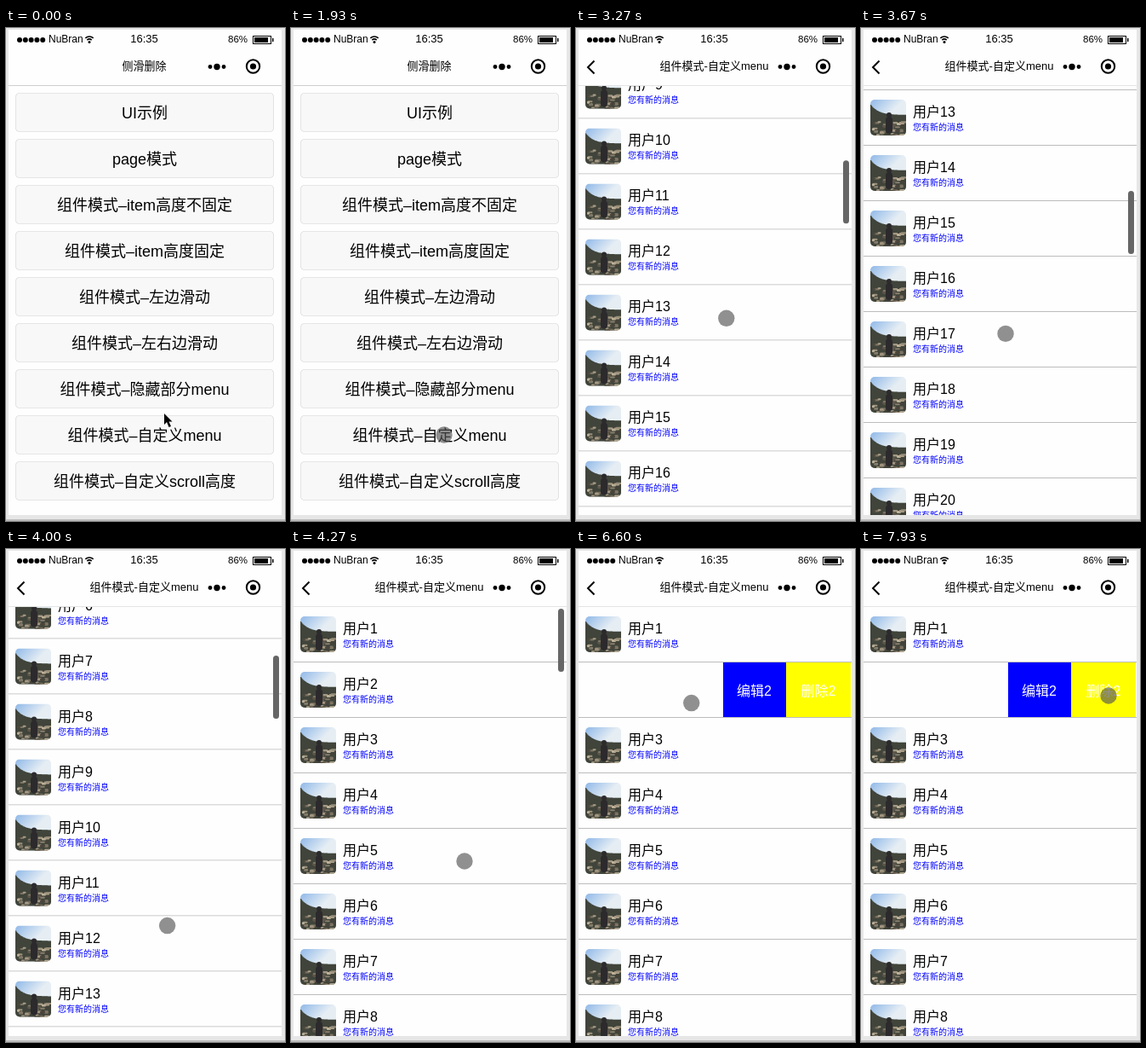
These frames come from a looping animation (328 px wide and 578 px high, 8000 ms). An HTML page with a canvas:

```html
<!DOCTYPE html>
<html lang="zh-CN">
<head>
<meta charset="utf-8">
<style>
html, body { margin: 0; overflow: hidden; }
canvas { display: block; width: 328px; height: 578px; }
</style>
</head>
<body>
<canvas></canvas>
<script>
const W = 328, H = 578, LOOP = 8000;
const TOP = 68, BOTTOM = 571, LEFT = 3, WIDTH = 321, ROW = 65, ROWS = 50, MENU = 151;
const FONT = '"Liberation Sans", "Noto Sans CJK SC", "Noto Sans CJK", sans-serif';
const PAPER = '#fefefe', INK = '#000', RULE = '#bcbcbc';
const MODE = '组件模式–';
const labels = ['UI示例', 'page模式', MODE + 'item高度不固定', MODE + 'item高度固定',
  MODE + '左边滑动', MODE + '左右边滑动', MODE + '隐藏部分menu',
  MODE + '自定义menu', MODE + '自定义scroll高度'];

const canvas = document.querySelector('canvas');
const c = canvas.getContext('2d');
const ratio = window.devicePixelRatio || 1;
canvas.width = W * ratio;
canvas.height = H * ratio;

// Timing: part is linear 0..1, ease is smooth 0..1, hop rises and returns to 0.
const part = (t, from, to) => Math.min(1, Math.max(0, (t - from) / (to - from)));
const ease = (t, from, to) => {
  const p = part(t, from, to);
  return p * p * (3 - 2 * p);
};
const hop = (t, from, to) => Math.sin(Math.PI * part(t, from, to));

const scrollAt = t => 775 * (ease(t, 2560, 3670) - ease(t, 3720, 4250));
const swipeAt = t => -MENU * ease(t, 5400, 5850);
const slideAt = t => WIDTH * (1 - ease(t, 2070, 2400));

function touchAt(t) {
  const aim = ease(t, 70, 800), tap = ease(t, 1470, 1530), open = ease(t, 2070, 2470);
  const up = ease(t, 2560, 3670), down = ease(t, 3670, 4270);
  const reach = ease(t, 4270, 5300), back = ease(t, 6400, 7930);
  return [
    186 - 13 * aim + 7 * tap + 13 * open - 23 * up + 34 * down + 75 * reach + swipeAt(t) + 163 * back,
    461 + 16 * aim + 5 * open - 124 * up + 8 * down - 185 * reach - 9 * back
      - 60 * hop(t, 2560, 3670) + 80 * hop(t, 3670, 4270)
  ];
}

function text(s, x, y, size, color = INK, align = 'left') {
  c.font = `${size}px ${FONT}`;
  c.fillStyle = color;
  c.textAlign = align;
  c.fillText(s, x, y);
}

function rect(x, y, w, h, color, r = 0) {
  c.fillStyle = color;
  c.beginPath();
  c.roundRect(x, y, w, h, r);
  c.fill();
}

function disc(x, y, r, color = INK) {
  c.fillStyle = color;
  c.beginPath();
  c.arc(x, y, r, 0, 7);
  c.fill();
}

function arc(x, y, r, from = 0, to = 7) {
  c.beginPath();
  c.arc(x, y, r, from, to);
  c.stroke();
}

function clipped(x, y, w, h, r, draw) {
  c.save();
  c.beginPath();
  c.roundRect(x, y, w, h, r);
  c.clip();
  draw();
  c.restore();
}

// Sky, a dark hill falling to the right, scattered rocks and a silhouette.
function avatar(x, y) {
  clipped(x, y, 42, 42, 5, () => {
    c.translate(x, y);
    const sky = c.createLinearGradient(0, 0, 20, 20);
    sky.addColorStop(0, '#8fb8e8');
    sky.addColorStop(1, '#e6eef4');
    rect(0, 0, 42, 42, sky);
    for (let i = 0; i < 42; i++) rect(i, 18 - 12 * Math.exp(-i / 9), 1.2, 42, '#40443a');
    let seed = 7;
    const random = () => (seed = seed * 16807 % 2147483647) / 2147483647;
    for (let i = 0; i < 45; i++) {
      const light = 70 + 130 * random();
      rect(42 * random() - 3, 25 + 17 * random(), 3 + 4 * random(), 2 + random(),
        `rgb(${light},${light * .93},${light * .8})`, 1);
    }
    rect(18, 20, 8, 20, '#2c2a2c', 4);
    disc(22, 18, 3, '#2c2a2c');
  });
}

function buttonPage() {
  labels.forEach((label, i) => {
    const y = 76 + i * 54;
    rect(11, y, 304, 46, '#d6d6d6', 5);
    rect(11.6, y + .6, 302.8, 44.8, '#f8f8f8', 4.4);
    text(label, 163, y + 29.5, 18, INK, 'center');
  });
}

function menuItem(label, x, w, y, color) {
  rect(x, y, w, ROW, color);
  text(label, x + w / 2, y + 39, 16, '#fff', 'center');
}

function userRow(n, y, dx) {
  rect(LEFT + dx, y, WIDTH, ROW, PAPER);
  avatar(11 + dx, y + 11);
  text('用户' + n, 61 + dx, y + 31, 16);
  text('您有新的消息', 61 + dx, y + 47, 10, '#00f');
}

function listPage(t) {
  const scroll = scrollAt(t);
  rect(LEFT, TOP, WIDTH, BOTTOM - TOP, PAPER);
  for (let i = Math.floor(scroll / ROW); i < ROWS; i++) {
    const y = TOP + i * ROW - scroll;
    if (y > BOTTOM) break;
    const dx = i === 1 ? swipeAt(t) : 0;
    if (dx) {
      menuItem('编辑2', 172, 75, y, '#00f');
      menuItem('删除2', 247, 76, y, '#ff0');
    }
    userRow(i + 1, y, dx);
    rect(LEFT, y + ROW - 1, WIDTH, 1, RULE);
  }
  const view = BOTTOM - TOP, bar = 74;
  c.globalAlpha = part(t, 2560, 2640) - part(t, 4600, 4900);
  rect(314, 70 + scroll * (view - bar) / (ROWS * ROW - view), 7, bar, '#666', 3.5);
  c.globalAlpha = 1;
}

function statusBar() {
  for (let i = 0; i < 5; i++) disc(16 + i * 6.8, 14, 3);
  text('NuBran', 50, 17, 12);
  c.strokeStyle = INK;
  c.lineWidth = 1.7;
  arc(98, 17, 4, -2.3, -.84);
  arc(98, 17, 7, -2.3, -.84);
  disc(98, 16.5, 1.5);
  text('16:35', 162.5, 17, 13, INK, 'center');
  text('86%', 261, 17, 11.5);
  c.lineWidth = 1;
  c.strokeRect(290.5, 9.5, 21, 9);
  rect(292, 11, 16, 6, INK);
  rect(313, 12, 1.5, 4, INK);
}

function navBar(inList) {
  text(inList ? '组件模式-自定义menu' : '侧滑删除', 162.5, 49, 13, INK, 'center');
  c.lineWidth = 2;
  if (inList) c.stroke(new Path2D('M21.5 38.5l-7.5 7.5l7.5 7.5'));
  for (const i of [-1, 0, 1]) disc(248 + 8 * i, 45.5, i ? 2.4 : 3.7);
  disc(290.5, 45, 3.6);
  arc(290.5, 45, 7.7);
  rect(LEFT, 67, WIDTH, 1, inList ? '#e4e4e4' : '#cfcfcf');
}

function pointer(t) {
  if (t >= 70) return disc(...touchAt(t), 9.7, 'rgba(85,85,85,.65)');
  c.fillStyle = INK;
  c.fill(new Path2D('M186 452v13l3-3 2.5 6 2.5-1-2.5-5.5h4z'));
}

function draw(t) {
  c.setTransform(ratio, 0, 0, ratio, 0, 0);
  rect(0, 0, W, H, '#e6e6e6');
  rect(0, H - 2, W, 2, RULE);
  rect(LEFT, 2, WIDTH, BOTTOM - 2, PAPER);
  clipped(LEFT, TOP, WIDTH, BOTTOM - TOP, 0, () => {
    const slide = slideAt(t);
    if (slide > 0) buttonPage();
    if (slide < WIDTH) {
      c.translate(slide, 0);
      listPage(t);
    }
  });
  statusBar();
  navBar(t >= 2070);
  pointer(t);
}

function frame() {
  draw(performance.now() % LOOP);
  requestAnimationFrame(frame);
}
frame();
</script>
</body>
</html>
```
